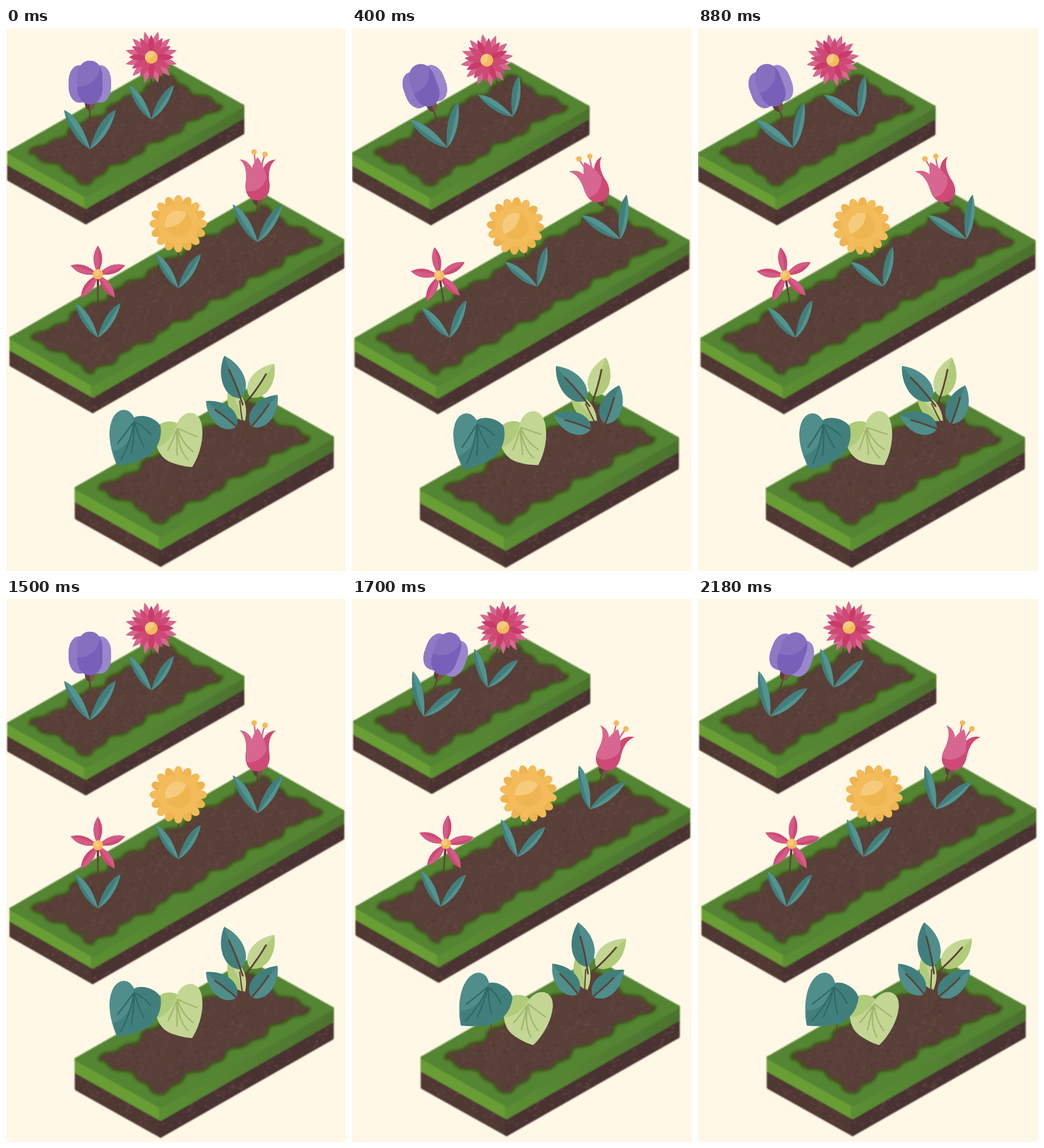
An HTML page for the animation above (2500 ms loop, 592 by 946 pixels).

```html
<!DOCTYPE html>
<html lang="en">
<head>
<meta charset="utf-8">
<title>Swaying garden</title>
<style>
html, body { margin: 0; width: 100%; height: 100%; overflow: hidden; background: #fff8e7; }
svg { display: block; width: 100%; height: 100%; }
</style>
</head>
<body>
<svg id="garden" viewBox="0 0 592 946"></svg>
<script>
const garden = document.getElementById("garden");
const PINK = "#d76790", ROSE = "#ce4975", YELLOW = "#f3bb5a", CREAM = "#f6cb7d";
const TEAL = "#417f7d", SEA = "#539490", LIME = "#b0cb79", PALE = "#c3d694", BROWN = "#5d4037";

let seed = 7;
const random = () => (seed = (seed * 16807) % 2147483647) / 2147483647;
const repeat = (n, draw) => Array.from({ length: n }, (_, i) => draw(i)).join("");
const path = (d, fill, more = "") => `<path d="${d}" fill="${fill}" ${more}/>`;
const line = (d, color, width = 2.5) => path(d, "none", `stroke="${color}" stroke-width="${width}" stroke-linecap="round"`);
const ellipse = (x, y, rx, ry, fill, more = "") =>
  `<ellipse cx="${x}" cy="${y}" rx="${rx}" ry="${ry}" fill="${fill}" ${more}/>`;
const disc = (x, y, r, fill) => ellipse(x, y, r, r, fill);
const block = (x, y, w, h, rx, ry, fill) =>
  `<rect x="${x}" y="${y}" width="${w}" height="${h}" rx="${rx}" ry="${ry}" fill="${fill}"/>`;
const ring = (n, offset, draw) => repeat(n, i => `<g transform="rotate(${offset + i * 360 / n})">${draw(i)}</g>`);
const at = (x, y, art) => `<g transform="translate(${x} ${y})">${art}</g>`;

// Soil specks, tiled over the earth
const speckColors = ["#704650", "#49302c", "#66504a", "#57452b"];
const specks = repeat(220, i => {
  const r = 0.8 + random() * 1.3;
  return ellipse(random() * 100, random() * 100, r * 1.3, r, speckColors[i % 4], 'opacity=".5"');
});

const defs = `<defs>
  <pattern id="specks" width="100" height="100" patternUnits="userSpaceOnUse">${specks}</pattern>
  <linearGradient id="side"><stop stop-color="#5b8f33"/><stop offset="1" stop-color="#4c722f"/></linearGradient>
  <filter id="soft" x="-5%" y="-5%" width="110%" height="110%"><feGaussianBlur stdDeviation=".8"/></filter>
  <filter id="blur"><feGaussianBlur stdDeviation="2"/></filter>
</defs>`;

// Ragged edge of the soil, a wavy distance inside the four sides of the bed
function soilOutline([lx, ly], [tx, ty], [fx, fy]) {
  const long = Math.hypot(tx - lx, ty - ly), wide = Math.hypot(fx - lx, fy - ly), margin = 22;
  const points = [];
  const add = (a, b) => points.push(
    (lx + (tx - lx) * a / long + (fx - lx) * b / wide).toFixed(1),
    (ly + (ty - ly) * a / long + (fy - ly) * b / wide).toFixed(1));
  const walk = (length, place) => {
    for (let s = margin; s <= length - margin; s += 4)
      place(s, margin + 3 + 3 * Math.sin(s / 6) + 4 * Math.sin(s / 13 + 2));
  };
  walk(long, (s, inset) => add(s, inset));
  walk(wide, (s, inset) => add(long - inset, s));
  walk(long, (s, inset) => add(long - s, wide - inset));
  walk(wide, (s, inset) => add(inset, wide - s));
  return `M${points}Z`;
}

function bed([lx, ly], [rx, ry], [fx, fy]) {
  const grass = 20, depth = 47, tx = lx + rx - fx, ty = ly + ry - fy;
  const soil = soilOutline([lx, ly], [tx, ty], [fx, fy]);
  const poly = (d, fill) => path(`M${d}Z`, fill, `stroke="${fill}" stroke-width="6" stroke-linejoin="round"`);
  const wall = (x, y, height, fill) => poly(`${x} ${y}L${fx} ${fy}v${height}L${x} ${y + height}`, fill);
  return `<g filter="url(#soft)">
    ${wall(lx, ly, depth, "#4f3733")}${wall(rx, ry, depth, "#4a3130")}
    ${path(`M${lx} ${ly}L${fx} ${fy}L${rx} ${ry}v${depth}L${fx} ${fy + depth}L${lx} ${ly + depth}Z`, "url(#specks)")}
    ${wall(lx, ly, grass, "#699e34")}${wall(rx, ry, grass, "url(#side)")}
    ${poly(`${lx} ${ly}L${tx} ${ty}L${rx} ${ry}L${fx} ${fy}`, "#538533")}
    ${path(soil, "#43501f", 'stroke="#43501f" stroke-width="8" stroke-linejoin="round" filter="url(#blur)"')}
    ${path(soil, "#583f38")}${path(soil, "url(#specks)")}
  </g>`;
}

const shortBed = bed([5, 217], [412, 136], [139, 292]);
const longBed = bed([9, 540], [586, 370], [151, 621]);
const beds = shortBed + longBed + `<g transform="translate(117.5 565) scale(1.092)">${shortBed}</g>`;

// Flowers have their origin where their two leaves meet
const blade = (side, outer, inner) => {
  const back = "-45 -68C-24 -60 -7 -28 0 0";
  return `<g transform="scale(${side} 1)">${path(`M0 0C-20 -10 -40 -40 ${back}`, outer)}${
    path(`M0 0C-18 -22 -34 -48 ${back}`, inner)}</g>`;
};
const flower = (size, height, head) => line(`M0 ${-height}V0`, BROWN) + line("M0 0V38", "#614139", 1.5)
  + `<g transform="scale(${size})">${blade(-1, SEA, TEAL)}${blade(1, TEAL, SEA)}</g>` + at(0, -height, head);
const sepal = y => path(`M-9 ${y}H9Q8 ${y + 12} 0 ${y + 13}Q-8 ${y + 12} -9 ${y}`, BROWN)
  + path(`M0 ${y}H9Q8 ${y + 12} 0 ${y + 13}`, "#795548");

const crocus = sepal(36)
  + block(-37, -30, 40, 65, 18, 27, "#8d79c4") + block(-3, -30, 40, 65, 18, 27, "#9a86cd")
  + block(-22, -38, 44, 76, 21, 27, "#7761b8")
  + path("M-22 -9C-22 -28 -12 -38 0 -38C8 -38 14 -34 17 -28C17 -8 0 8 -22 7Z", "#8570c0");

const daisyPetal = (length, fill) => path(`M0 0C-7 -15 -8 ${14 - length} 0 ${-length}C8 ${14 - length} 7 -15 0 0`, fill);
const daisy = ring(12, 15, () => daisyPetal(46, PINK))
  + ring(12, 0, i => daisyPetal(39, i % 3 ? ROSE : "#c93b69"))
  + disc(0, 0, 11, YELLOW) + path("M-11 0A11 11 0 0 1 6 -9Q3 4 -10 4Z", CREAM);

const sunflower = ring(16, 0, i => ellipse(0, -37, 8, 13, i % 2 ? "#efb450" : YELLOW))
  + disc(0, 0, 36, YELLOW) + disc(0, 0, 23, "#efb550")
  + path("M-22 7A23 23 0 0 1 14 -18Q8 4 -22 7", CREAM);

const star = line("M0 8V19", BROWN, 4)
  + ring(5, 0, () => path("M0 0C-5 -12 -14 -29 0 -50C14 -29 5 -12 0 0", ROSE)
    + path("M0 0C-5 -12 -14 -29 0 -50Q3 -28 0 0", "#d45b86"))
  + disc(0, 0, 9, YELLOW) + disc(-2, -2, 5, CREAM);

const stamen = (x, y) => line(`M${x} ${y}Q${x / 2} -64 ${x / 2} -45`, PINK) + disc(x, y, 4.8, YELLOW);
const tulip = sepal(-3) + stamen(-6, -84) + stamen(13, -80)
  + path("M-31 -71Q-17 -70 -10 -56L0 -46L10 -56Q17 -70 32 -71C20 -62 18 -46 21 -28C22 -8 12 0 0 0C-12 0 -22 -8 -21 -28C-18 -46 -20 -62 -31 -71", ROSE)
  + path("M-31 -71Q-17 -70 -10 -56L-2 -34L-20 -16Q-21 -24 -20 -36C-19 -52 -22 -64 -31 -71", PINK)
  + path("M0 -75C-10 -63 -15 -40 -20 -16Q4 -12 16 -38Q11 -62 0 -75", PINK);

const hearts = at(-259.5, -764,
  line("M240 735Q253 775 260 812M290 750Q272 780 265 810", "#624139", 2)
  + path("M324 765C337 745 345 716 341 692C336 663 308 665 298 689C287 682 268 686 262 697C256 720 264 748 288 757Q306 764 324 765", PALE)
  + path("M298 689C287 682 268 686 262 697Q259 715 264 730Q288 722 298 689", LIME)
  + line("M298 698Q300 735 317 752M299 700Q308 725 326 738M300 698Q315 705 333 712M297 702Q298 727 298 744M296 702Q290 720 282 735", "#a0b76a", 2.4)
  + path("M194 763C182 738 177 707 183 688C190 662 213 658 223 679C236 671 261 679 269 693C273 717 261 740 240 750Q220 759 194 763", TEAL)
  + path("M194 763C182 738 177 707 183 688C190 662 213 658 223 679Q221 728 187 738Z", "#4f8e8b")
  + line("M223 686Q217 722 200 753M223 688Q223 718 218 741M224 688Q231 712 240 729M225 687Q238 692 252 708M221 688Q207 708 194 724", "#2f6866", 2.4));

// A leaf bulges by the given width on both sides of the line from its base to its tip
const leaf = (x, y, tipX, tipY, width, dark, light) => {
  const length = Math.hypot(tipX - x, tipY - y), angle = Math.atan2(tipY - y, tipX - x) * 180 / Math.PI;
  const half = w => `C${length * 0.12} ${w} ${length * 0.65} ${w} ${length} 0`;
  return at(x, y, `<g transform="rotate(${angle})">${path(`M0 0${half(width)}L0 0${half(-width)}Z`, dark)}${
    path(`M0 0${half(width)}Z`, light)}${line(`M-12 0Q${length * 0.3} 2 ${length * 0.68} -1`, BROWN, 3)}</g>`);
};
const shrub = at(-417, -611,
  path("M388 625C380 657 392 680 416 685C422 660 415 635 388 625", PALE)
  + path("M388 625C380 657 392 680 416 685Q404 660 388 625", LIME)
  + repeat(5, i => line(`M${400 + i * 7} ${i % 2 ? 650 : 684}L416 722`, BROWN, 2.2))
  + line("M412 650L414 682", PALE, 2)
  + leaf(408, 645, 380, 571, 26, TEAL, "#4f8e8b")
  + leaf(425, 643, 467, 585, 25, PALE, LIME)
  + leaf(427, 694, 473, 639, 25, TEAL, "#4f8e8b")
  + leaf(401, 695, 348, 650, 25, "#4f8e8b", TEAL));

// Each plant turns about a point above its origin, by its own angle to either side
const parts = [
  { art: beds, x: 0, y: 0, pivot: 0, left: 0, right: 0 },
  { art: flower(1, 116, crocus), x: 146, y: 211, pivot: 62, left: -20, right: 19.4 },
  { art: flower(0.872, 108, daisy), x: 253, y: 159, pivot: 68, left: -24.7, right: 14.4 },
  { art: flower(0.962, 73, tulip), x: 438, y: 373, pivot: 72, left: -25, right: 19.3 },
  { art: flower(0.872, 112, sunflower), x: 300, y: 453, pivot: 71, left: -19.8, right: 9.8 },
  { art: flower(0.872, 110, star), x: 160, y: 539, pivot: 70, left: -9.5, right: 4.8 },
  { art: hearts, x: 259.5, y: 764, pivot: 27, left: -4.5, right: 14.3 },
  { art: shrub, x: 417, y: 611, pivot: -37, left: -19.3, right: 9.8 },
];
const shifts = { upright: [0, 0], left: [-1.5, 1.5], right: [0, -2.7] };
garden.innerHTML = defs + parts.map(part => `<g class="part">${part.art}</g>`).join("");
const groups = garden.querySelectorAll(".part");

let shown;
function update() {
  const time = performance.now() % 2500;
  const pose = time >= 1700 ? "right" : time >= 400 && time < 1200 ? "left" : "upright";
  if (pose !== shown) {
    shown = pose;
    const [dx, dy] = shifts[pose];
    parts.forEach((part, i) => groups[i].setAttribute("transform",
      `translate(${part.x + dx} ${part.y + dy}) rotate(${part[pose] || 0} 0 ${-part.pivot})`));
  }
  requestAnimationFrame(update);
}
update();
</script>
</body>
</html>
```
